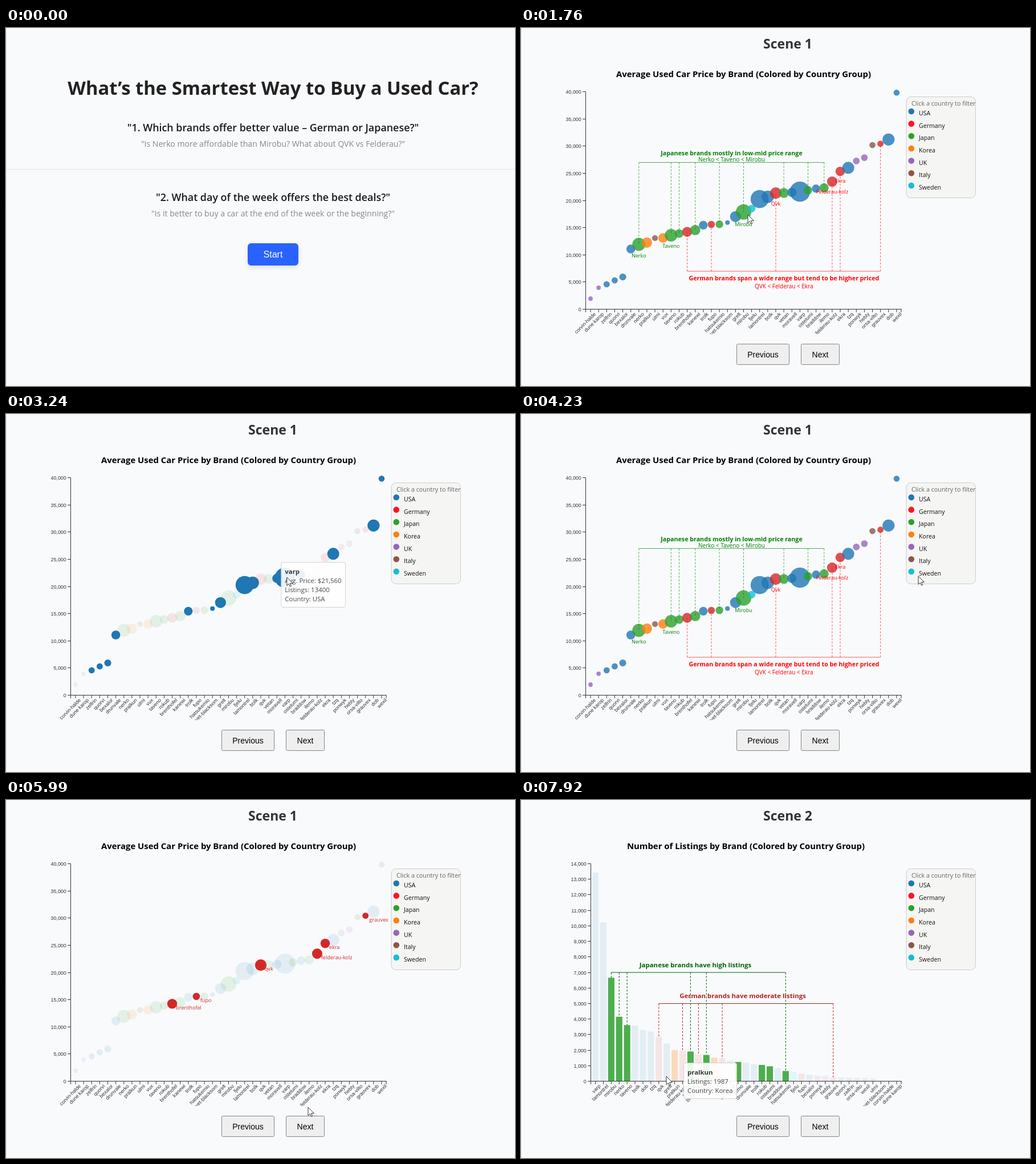
Recreate the animation shown at these times as an HTML page with a canvas. Size 893 by 627 pixels, loop 7990 ms.

```html
<!DOCTYPE html>
<html lang="en">
<head>
<meta charset="utf-8">
<title>Used car prices</title>
<style>
  html, body { margin: 0; width: 100%; height: 100%; overflow: hidden; background: #f9fafc; }
  canvas { display: block; }
</style>
</head>
<body>
<canvas id="stage" width="893" height="627"></canvas>
<script>
const ctx = document.getElementById("stage").getContext("2d");
const LOOP = 7990, SCENE_1 = 800, SCENE_2 = 6270, FADE = 200;
const SANS = '"Open Sans", "Noto Sans", sans-serif';
const ARIAL = '"Liberation Sans", sans-serif';
const BASE = 492, HEIGHT = 381, RIGHT = 667;

const COLORS = {
  USA: "#1f77b4", Germany: "#d62728", Japan: "#2ca02c", Korea: "#ff7f0e",
  UK: "#9467bd", Italy: "#8c564b", Sweden: "#17becf"
};

// name, country, average price, listings
const brands = [
  ["corvin-halde", "UK", 1890, 3], ["dune karop", "UK", 3900, 2],
  ["zelfrin", "USA", 4520, 200], ["quorvi", "USA", 5250, 205],
  ["bexalor", "USA", 5880, 390], ["drunvale", "USA", 11020, 1160],
  ["nerko", "Japan", 11870, 4130], ["pralkun", "Korea", 12200, 1987],
  ["ulmi", "Italy", 13020, 140], ["vux", "Korea", 13030, 1500],
  ["taveno", "Japan", 13550, 3590], ["rokub", "Japan", 13860, 1030],
  ["brenthofel", "Germany", 14180, 1700], ["kanewi", "Japan", 14500, 1890],
  ["trolk", "USA", 15400, 1070], ["fupo", "Germany", 15540, 470],
  ["hatsukemio", "Japan", 15560, 640], ["dorvet-blacksom", "USA", 15880, 10],
  ["grelt", "USA", 16980, 2400], ["mirobu", "Japan", 17820, 6640],
  ["fjelu", "Sweden", 18450, 580], ["lamontrel", "USA", 20200, 10200],
  ["bolk", "USA", 20621, 3566], ["qvk", "Germany", 21300, 2840],
  ["vetan", "Japan", 21330, 1670], ["moravell", "USA", 21430, 1300],
  ["varp", "USA", 21560, 13400], ["ostelumi", "Japan", 21800, 940],
  ["braddow", "USA", 22120, 830], ["ilemo", "Japan", 22260, 1220],
  ["felderau-kolz", "Germany", 23400, 1950], ["ekra", "Germany", 25280, 1430],
  ["tzq", "USA", 25950, 3180], ["ponwyk", "UK", 27200, 340],
  ["hebly", "UK", 27820, 320], ["orsa-vilto", "Italy", 30130, 190],
  ["grauvex", "Germany", 30380, 210], ["dob", "USA", 31150, 3270],
  ["wexil", "USA", 39760, 170]
].map(([name, country, price, listings]) => ({ name, country, price, listings }));

const dots = brands.map((b, i) => ({
  ...b, x: 122 + 14.13 * i, y: BASE - HEIGHT * b.price / 40000,
  r: 3.7 + 0.121 * Math.sqrt(b.listings)
}));
const bars = [...brands].sort((a, b) => b.listings - a.listings).map((b, i) => ({
  ...b, x: 130.5 + 13.91 * i, y: BASE - HEIGHT * b.listings / 14000
}));

// Highlights: hovering names a brand, filtering through the legend does not.
const priceFocus = [
  { at: 1850, country: "Japan", brand: "mirobu" },
  { at: 2050 },
  { at: 2300, country: "USA", brand: "bolk" },
  { at: 2530, country: "Japan", brand: "vetan" },
  { at: 2790, country: "USA", brand: "varp" },
  { at: 3300 },
  { at: 4600, country: "Korea", filter: true },
  { at: 5100, country: "Japan", filter: true },
  { at: 5580, country: "Germany", filter: true }
];
const listingFocus = [
  { at: 7500, country: "Japan", brand: "vetan" },
  { at: 7740, country: "Japan", brand: "kanewi" },
  { at: 7850, country: "Korea", brand: "pralkun" }
];

// Pointer path: time, x, y
const path = [
  [260, 520, 640], [600, 470, 402], [1010, 470, 398], [1220, 470, 398],
  [1760, 398, 327], [1970, 402, 322], [2030, 402, 322], [2300, 434, 294],
  [2440, 442, 292], [2500, 460, 288], [2770, 461, 288], [2800, 478, 287],
  [3040, 492, 286], [3240, 492, 286], [3600, 784, 285], [3890, 700, 300],
  [4030, 700, 300], [4230, 697, 284], [4760, 699, 214], [4840, 699, 214],
  [4900, 709, 185], [5100, 709, 185], [5170, 711, 180], [5310, 711, 180],
  [5440, 715, 166], [5580, 715, 166], [5640, 717, 160], [5780, 717, 160],
  [5990, 530, 538], [6200, 525, 570], [6500, 511, 543], [6630, 511, 543],
  [7100, 399, 503], [7370, 347, 496], [7440, 347, 496], [7500, 331, 490],
  [7740, 303, 489], [7850, 275, 488], [7920, 255, 484]
];

const ease = k => k < 0.5 ? 4 * k ** 3 : 1 - 4 * (1 - k) ** 3;
const capital = s => s[0].toUpperCase() + s.slice(1);

function pointerAt(t) {
  const next = path.findIndex(p => p[0] > t);
  if (next === 0) return path[0].slice(1);
  if (next < 0) return path[path.length - 1].slice(1);
  const [a, b] = [path[next - 1], path[next]];
  const k = (t - a[0]) / (b[0] - a[0]);
  return [a[1] + (b[1] - a[1]) * k, a[2] + (b[2] - a[2]) * k];
}

// Follows a value through all highlights, each fading from where the last one got to.
function follow(focus, t, start, target) {
  return focus.reduce((value, e, i) => {
    if (e.at > t) return value;
    const end = Math.min(t, focus[i + 1]?.at ?? t);
    const k = e.filter ? 1 : ease(Math.min(1, (end - e.at) / FADE));
    return value + (target(e) - value) * k;
  }, start);
}

function text(str, x, y, size, { color = "#222", weight = 400, align = "center", font = SANS } = {}) {
  ctx.font = `${weight} ${size}px ${font}`;
  ctx.fillStyle = color;
  ctx.textAlign = align;
  ctx.fillText(str, x, y);
}

function line(x1, y1, x2, y2, color, dash = []) {
  ctx.strokeStyle = color;
  ctx.lineWidth = 1;
  ctx.setLineDash(dash);
  ctx.beginPath();
  ctx.moveTo(x1, y1);
  ctx.lineTo(x2, y2);
  ctx.stroke();
  ctx.setLineDash([]);
}

function box(x, y, w, h, radius, fill, stroke) {
  ctx.beginPath();
  ctx.roundRect(x, y, w, h, radius);
  ctx.fillStyle = fill;
  ctx.fill();
  if (!stroke) return;
  ctx.strokeStyle = stroke;
  ctx.lineWidth = 1;
  ctx.stroke();
}

function circle(x, y, r, color) {
  ctx.fillStyle = color;
  ctx.beginPath();
  ctx.arc(x, y, r, 0, 2 * Math.PI);
  ctx.fill();
}

function withAlpha(alpha, draw) {
  if (alpha < 0.005) return;
  ctx.globalAlpha = alpha;
  draw();
  ctx.globalAlpha = 1;
}

function drawIntro() {
  const question = { weight: 600, color: "#1a1a1a" }, hint = { color: "#888" };
  text("What’s the Smartest Way to Buy a Used Car?", 468.5, 117, 32.75, { weight: 700 });
  text('"1. Which brands offer better value – German or Japanese?"', 468.5, 180.5, 17.9, question);
  text('"Is Nerko more affordable than Mirobu? What about QVK vs Felderau?"', 468.5, 208, 14.1, hint);
  line(0, 247.5, 893, 247.5, "#e2e4e8");
  text('"2. What day of the week offers the best deals?"', 468.5, 303, 17.9, question);
  text('"Is it better to buy a car at the end of the week or the beginning?"', 468.5, 330, 14.1, hint);
  ctx.shadowColor = "rgba(0,0,0,.12)";
  ctx.shadowBlur = 8;
  ctx.shadowOffsetY = 3;
  box(424, 377, 89, 39, 6, "#2962ff");
  ctx.shadowColor = "transparent";
  text("Start", 468.5, 401.5, 16, { color: "#fff", font: ARIAL });
}

function drawFrame(scene, title, titleX) {
  text(scene, 468, 36, 23, { weight: 700, color: "#333" });
  text(title, titleX, 85.5, 14.9, { weight: 700, color: "#000" });
  box(378.5, 553.5, 92, 36, 2, "#efefef", "#868686");
  box(491.5, 553.5, 67, 36, 2, "#efefef", "#868686");
  text("Previous", 424.5, 576.5, 14, { color: "#000", font: ARIAL });
  text("Next", 525, 576.5, 14, { color: "#000", font: ARIAL });

  box(676, 120.5, 121.5, 177, 8, "#f5f5f3", "#ccc");
  text("Click a country to filter", 685, 136, 10.8, { color: "#666", align: "left" });
  Object.keys(COLORS).forEach((country, i) => {
    const y = 146 + 21.65 * i;
    circle(684.8, y, 5.3, country === "Germany" ? "#fb1429" : COLORS[country]);
    text(country, 698, y + 7, 10.6, { color: "#111", align: "left" });
  });
}

function drawAxes(left, max, step, items) {
  const ink = "#333", bottom = BASE + 0.5, top = BASE - HEIGHT + 0.5;
  line(left, top, left, bottom, ink);
  line(left, bottom, RIGHT + 0.5, bottom, ink);
  line(RIGHT, bottom, RIGHT, bottom + 5.3, ink);
  line(left, bottom, left, bottom + 5.3, ink);
  for (let v = 0; v <= max; v += step) {
    const y = Math.round(BASE - HEIGHT * v / max) + 0.5;
    line(left - 5.3, y, left, y, ink);
    text(v.toLocaleString("en-US"), left - 7.8, y + 3, 8.9, { color: ink, align: "right", font: ARIAL });
  }
  ctx.save();
  ctx.beginPath();
  ctx.rect(0, 480, 893, 56);
  ctx.clip();
  for (const { name, x } of items) {
    line(x, bottom, x, bottom + 5.3, ink);
    ctx.save();
    ctx.translate(x, BASE);
    ctx.rotate(-Math.PI / 4);
    text(name, 0, 13.7, 8.9, { color: ink, align: "right", font: ARIAL });
    ctx.restore();
  }
  ctx.restore();
}

function drawBracket(items, y, color) {
  line(items[0].x, y, items[items.length - 1].x, y, color);
  for (const item of items) line(item.x, y, item.x, item.y, color, [3.5, 2.5]);
}

function drawTooltip(focus, t, describe) {
  const hover = focus.filter(e => e.at <= t && e.brand).pop();
  if (!hover) return;
  const brand = brands.find(b => b.name === hover.brand);
  const lines = [...describe(brand), "Country: " + brand.country];
  const [px, py] = pointerAt(hover.at), x = px + 10, y = py - 28;
  withAlpha(follow(focus, t, 0, e => e.brand ? 0.9 : 0), () => {
    ctx.font = `400 11.4px ${SANS}`;
    const width = Math.max(...lines.map(s => ctx.measureText(s).width)) + 13.5;
    box(x + 0.5, y + 0.5, width, 30 + 16.2 * lines.length, 3, "#fff", "#ccc");
    text(brand.name, x + 7, y + 20.5, 11.4, { weight: 700, align: "left" });
    lines.forEach((s, i) => text(s, x + 7, y + 36.7 + 16.1 * i, 11.4, { color: "#333", align: "left" }));
  });
}

function drawPriceNotes() {
  const of = country => dots.filter(d => d.country === country);
  const green = { color: "#008000" }, red = { color: "#ff0000" };
  const alpha = ctx.globalAlpha;
  ctx.globalAlpha = alpha * 0.65;
  drawBracket(of("Japan"), 235.5, green.color);
  drawBracket(of("Germany"), 426, red.color);
  ctx.globalAlpha = alpha;
  text("Japanese brands mostly in low-mid price range", 369.5, 222.5, 10.7, { ...green, weight: 700 });
  text("Nerko < Taveno < Mirobu", 369.5, 234, 10, green);
  text("German brands span a wide range but tend to be higher priced", 461.3, 442, 10.7, { ...red, weight: 700 });
  text("QVK < Felderau < Ekra", 461.3, 456, 10, red);
  for (const name of ["nerko", "taveno", "mirobu", "qvk", "felderau-kolz", "ekra"]) {
    const d = dots.find(dot => dot.name === name);
    text(capital(name), d.x, d.y + d.r + 11.5, 9.1, d.country === "Japan" ? green : red);
  }
}

function drawPrices(t) {
  const target = country => e => !e.country ? 0.8 : e.country === country ? 1 : 0.1;
  const current = priceFocus.filter(e => e.at <= t).pop();
  drawFrame("Scene 1", "Average Used Car Price by Brand (Colored by Country Group)", 390.5);
  drawAxes(113.5, 40000, 5000, dots);
  for (const d of dots) {
    withAlpha(follow(priceFocus, t, 0.8, target(d.country)), () => circle(d.x, d.y, d.r, COLORS[d.country]));
  }
  withAlpha(follow(priceFocus, t, 1, e => e.country ? 0 : 1), drawPriceNotes);
  if (current?.filter) {
    for (const d of dots.filter(dot => dot.country === current.country)) {
      text(d.name, d.x + 6.8, d.y + 10, 9.1, { color: COLORS[d.country], align: "left" });
    }
  }
  drawTooltip(priceFocus, t, b => ["Avg. Price: $" + b.price.toLocaleString("en-US"), "Listings: " + b.listings]);
}

function drawListings(t) {
  const target = country => e => e.country === country ? 1 : 0.1;
  const pick = (...names) => bars.filter(b => names.includes(b.name));
  const green = "#006400", red = "#b22222";
  drawFrame("Scene 2", "Number of Listings by Brand (Colored by Country Group)", 394.5);
  for (const b of bars) {
    withAlpha(follow(listingFocus, t, 1, target(b.country)), () => {
      ctx.fillStyle = COLORS[b.country];
      ctx.fillRect(b.x - 5.55, b.y, 11.1, BASE - b.y);
    });
  }
  drawAxes(122.5, 14000, 1000, bars);
  drawBracket(pick("mirobu", "nerko", "taveno", "kanewi", "vetan", "hatsukemio"), 302, green);
  drawBracket(pick("qvk", "felderau-kolz", "brenthofel", "ekra", "grauvex"), 356.5, red);
  text("Japanese brands have high listings", 306, 293, 11.45, { weight: 700, color: green });
  text("German brands have moderate listings", 389, 347, 11.45, { weight: 700, color: red });
  drawTooltip(listingFocus, t, b => ["Listings: " + b.listings]);
}

function drawPointer(t) {
  const [x, y] = pointerAt(t);
  if (t > SCENE_2 && y > 495 && y < 530) {
    line(x + 0.5, y - 7, x + 0.5, y + 7, "#111");
    for (const end of [-7, 7]) line(x - 3.5, y + end, x + 4.5, y + end, "#111");
    return;
  }
  ctx.save();
  ctx.translate(x, y);
  const arrow = new Path2D("M0 0V14.5L3.4 11.4 5.6 16.2 7.7 15.3 5.6 10.6H10.4Z");
  ctx.fillStyle = "#fff";
  ctx.fill(arrow);
  ctx.strokeStyle = "#222";
  ctx.lineWidth = 0.9;
  ctx.stroke(arrow);
  ctx.restore();
}

function render(now) {
  const t = now % LOOP;
  ctx.fillStyle = "#f9fafc";
  ctx.fillRect(0, 0, 893, 627);
  line(0.5, 0, 0.5, 627, "#e6e8ec");
  if (t < SCENE_1) drawIntro();
  else if (t < SCENE_2) drawPrices(t);
  else drawListings(t);
  drawPointer(t);
  requestAnimationFrame(() => render(performance.now()));
}
render(performance.now());
</script>
</body>
</html>
```
